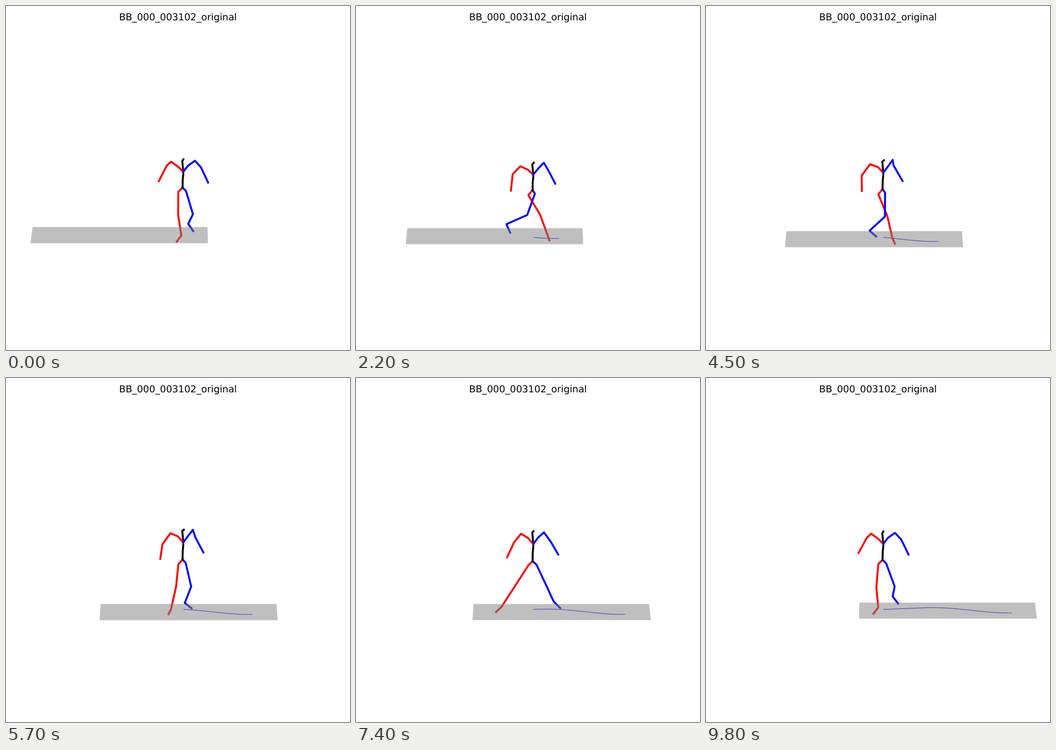
Recreate the animation shown at these times as an HTML page. Size 600 px wide and 600 px high, loop 9.9 s.

```html
<!DOCTYPE html>
<html lang="en">
<head>
<meta charset="utf-8">
<title>Walk cycle</title>
<style>
  html, body { margin: 0; width: 100%; height: 100%; overflow: hidden; background: #fff; }
  svg { display: block; width: 600px; height: 600px; }
  text { font: 16.67px "DejaVu Sans", sans-serif; text-anchor: middle; text-rendering: geometricPrecision; }
  polyline { fill: none; stroke-width: 3.33; stroke-linecap: square; stroke-linejoin: round; }
  .red { stroke: #f00; }
  .blue { stroke: #00f; }
  .black { stroke: #000; }
  #trail { stroke-width: 1; }
  #floor { fill: rgba(128, 128, 128, .5); }
</style>
</head>
<body>
<svg viewBox="0 0 600 600">
  <text x="300" y="24.6">BB_000_003102_original</text>
  <polyline id="trail" class="blue"/>
  <polyline id="legR" class="red"/>
  <polyline id="legL" class="blue"/>
  <polyline id="spine" class="black"/>
  <polyline id="armR" class="red"/>
  <polyline id="armL" class="blue"/>
  <polygon id="floor"/>
</svg>
<script>
const STEPS = 99, STEP_MS = 100;
const OMEGA = 2 * Math.PI / 100.6;         // one stride, in steps

// Swing once per stride, plus an optional swing once per footfall.
const wave = (mean, amp = 0, peak = 0, amp2 = 0, peak2 = 0) => t =>
  mean + amp * Math.cos(OMEGA * (t - peak)) + amp2 * Math.cos(2 * OMEGA * (t - peak2));

// A joint hangs at a swinging offset from another joint.
const joint = (base, dx, dy) => t => {
  const [x, y] = base(t);
  return [x + dx(t), y + dy(t)];
};

const between = (a, b, k, dx) => t => {
  const [ax, ay] = a(t), [bx, by] = b(t);
  return [ax + (bx - ax) * k + dx, ay + (by - ay) * k];
};

const origin = () => [0, 0];
const root = joint(origin, wave(308), wave(319, 1.2, 31, 2.5, 31));
const chest = joint(root, wave(1.2), wave(-28.3, 1.5, 17));
const neck = joint(chest, wave(-1.7), wave(-19.1, 1.5, 17));

const limbs = {
  spine: [
    root,
    between(root, chest, .48, -.4),
    between(root, chest, .86, .2),
    chest,
    neck,
    joint(neck, wave(2.4, .6, 40), wave(-2.8, -.8, 10))
  ],
  legR: [
    root,
    joint(root, wave(-7.4), wave(8.1, 1, 36)),
    joint(root, wave(-5.7, 23, 28, 2.8, 44), wave(45.3, 0, 0, 2.8, 1)),
    joint(root, wave(-6.3, 41, 26, 8, 45), wave(81.7, 2.3, 57, 4, 3)),
    joint(root, wave(-9.2, 49, 27.3, 9, 43), wave(91.7, 1, 57, 3.7, 1))
  ],
  legL: [
    root,
    joint(root, wave(5.4, 1.6, 82), wave(6.2)),
    joint(root, wave(10.5, 18, 79.3, 3.5, 47.5), wave(45.2, 1, 45, 2.2, 0)),
    joint(root, wave(-2.6, 44, 79.3, 4, 41.7), wave(67, 7.5, 61, 2.2, 1)),
    joint(root, wave(7.3, 46, 78.6, 5, 41.7), wave(79.2, 5.3, 61, 1, 3))
  ],
  armR: [
    chest,
    joint(chest, wave(-9.3), wave(-9.7, 1.2, 17)),
    joint(chest, wave(-22, -1, 40), wave(-16.4, 2.2, 34)),
    joint(chest, wave(-34, -4.6, 44, 1.1, 0), wave(-2.3, 8, 46, .9, 25)),
    joint(chest, wave(-41.3, 4.3, 34, .9, 0), wave(24.7, 8, 43, 1.3, 27))
  ],
  armL: [
    chest,
    joint(chest, wave(8.2), wave(-10.8, .6, 17)),
    joint(chest, wave(18.4, -2, 47), wave(-20.8, -1.6, 47)),
    joint(chest, wave(26.4, -7.2, 41, 1.8, 25), wave(-7.9, -4, 32, 2, 22)),
    joint(chest, wave(39.7, -5.8, 41, 1.5, 30), wave(16.9, -2.2, 37, 1.3, 10))
  ]
};

// The floor slides right at walking pace; its front edge sinks slowly.
const surge = wave(-5.6, 4.3, 2, 2, 45);
const sway = wave(416.2, 2.9, 59);
const travel = t => 2.287 * t + surge(t);
const front = t => .0596 * t + sway(t);

const byId = id => document.getElementById(id);
const plot = (id, pts) => byId(id).setAttribute("points",
  pts.map(p => p.map(v => v.toFixed(2)).join()).join(" "));

function floorShape(t) {
  const y = front(t), left = 42.4 + travel(t);
  const right = left + 309.5 + (y - 414) * .15;
  const far = x => 310 + (x - 310) / 1.014;
  return [[far(left), y - 28.1], [far(right), y - 28.1], [right, y], [left, y]];
}

function trail(t) {
  const pts = [];
  for (let s = 0; t > 1 && s <= t; s++) {
    pts.push([310 + (travel(t) - travel(s)) * .993, 403.6 + front(t) - front(s)]);
  }
  return pts;
}

let shown = -1;
function draw(now) {
  const t = Math.floor(now / STEP_MS) % STEPS;
  if (t === shown) return;
  shown = t;
  for (const id in limbs) plot(id, limbs[id].map(at => at(t)));
  plot("trail", trail(t));
  plot("floor", floorShape(t));
}

let start;
function tick(now) {
  start ??= now;
  draw(now - start);
  requestAnimationFrame(tick);
}
draw(0);
requestAnimationFrame(tick);
</script>
</body>
</html>
```
